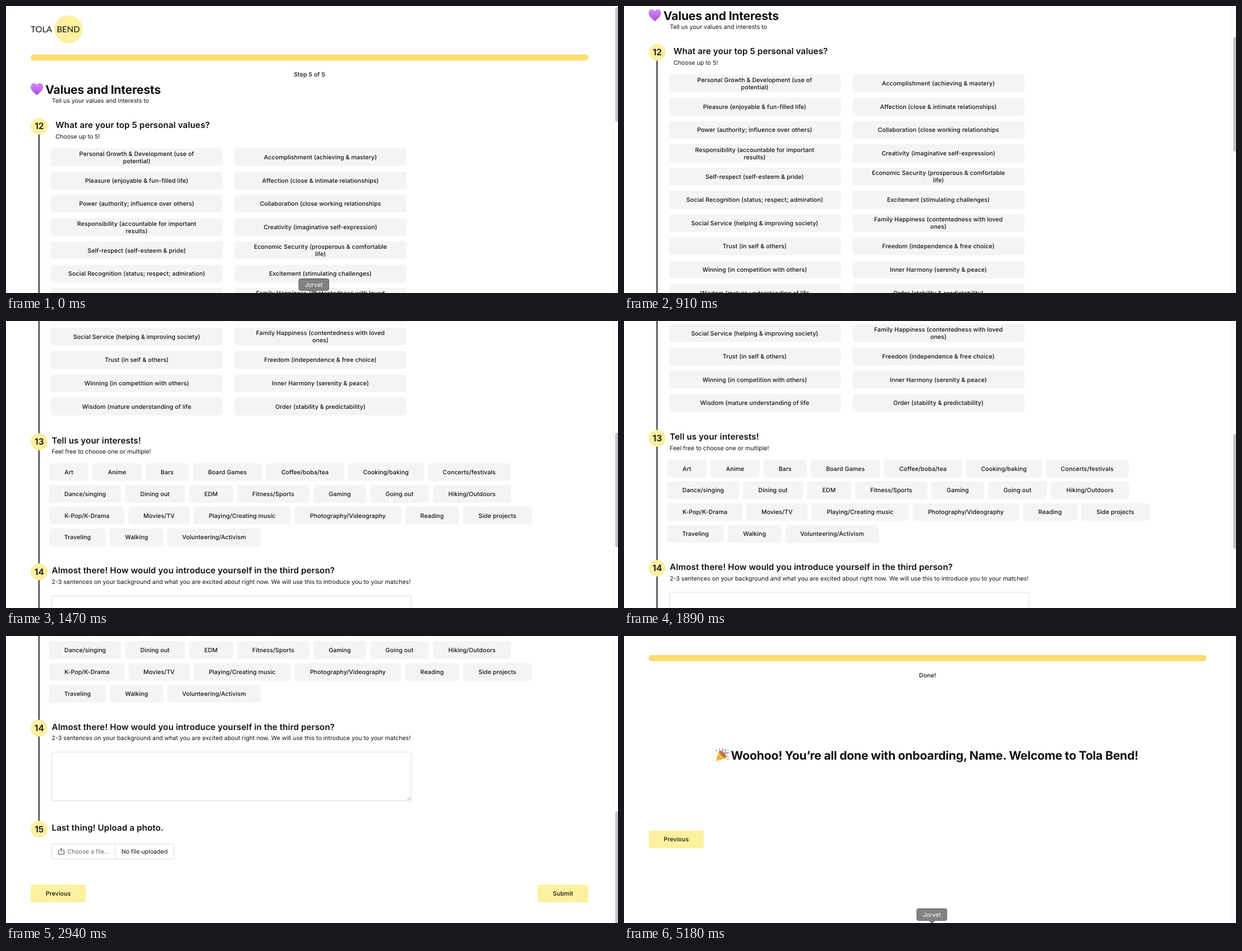
Animation of 1091 by 513 pixels, one loop 5.25 s. Source, as an HTML page:

```html
<!DOCTYPE html>
<html lang="en">
<head>
<meta charset="utf-8">
<title>Onboarding form</title>
<style>
  html, body { margin: 0; width: 100%; height: 100%; overflow: hidden; background: #fff; }
  svg { display: block; width: 1091px; height: 513px; }
  text { font-family: Inter, sans-serif; font-size: 10.6px; fill: #111; text-rendering: geometricPrecision; }
  .label { font-weight: 500; letter-spacing: .008em; }
  .title { font-size: 15.15px; font-weight: 600; letter-spacing: .007em; }
  .big { font-size: 21.2px; font-weight: 700; letter-spacing: -.012em; }
  .num { font-size: 15.6px; font-weight: 600; }
  .logo { font-family: Lato, sans-serif; font-size: 15px; }
  .mute { fill: #6a6a6a; }
  .tip { fill: #fff; }
</style>
</head>
<body>
<svg id="stage" viewBox="0 0 1091 513">
  <defs>
    <linearGradient id="violet" x1="0" y1="0" x2="0" y2="1">
      <stop offset="0" stop-color="#d48bf5"/>
      <stop offset="1" stop-color="#a650dd"/>
    </linearGradient>
  </defs>
  <g id="form"></g>
  <g id="done"></g>
  <rect x="1083" width="1" height="513" fill="#f1f1f1"/>
  <rect id="thumb" x="1086" y="2" width="8" height="205" rx="3.5" fill="#c5c5c5"/>
  <g id="tip"></g>
</svg>
<script>
const NS = 'http://www.w3.org/2000/svg';
const $ = id => document.getElementById(id);
const form = $('form'), done = $('done'), tip = $('tip'), thumb = $('thumb');
const PALE = '#fdf0a0', GOLD = '#fbdd6f', GREY = '#f4f4f4', INK = '#111';

function add(parent, tag, attrs) {
  const el = document.createElementNS(NS, tag);
  for (const k in attrs) el.setAttribute(k, attrs[k]);
  return parent.appendChild(el);
}
const rect = (p, x, y, width, height, rx, fill, more) =>
  add(p, 'rect', { x, y, width, height, rx, fill, ...more });
const path = (p, d, attrs) => add(p, 'path', { d, fill: 'none', ...attrs });
const disc = (cx, cy, r) =>
  add(form, 'circle', { cx, cy, r, fill: PALE, stroke: PALE, 'stroke-opacity': .5, 'stroke-width': 1.5 });

// y is the middle of the capitals
const CAP = { title: 5.1, big: 7.3, num: 5.4, logo: 5.4 };
function text(p, str, x, y, cls = '', anchor = 'start') {
  add(p, 'text', { x, y: y + (CAP[cls] || 3.85), class: cls, 'text-anchor': anchor }).textContent = str;
}
const label = (p, str, x, y, cls = 'label') => text(p, str, x, y, cls, 'middle');

function button(p, str, x, y, w) {
  rect(p, x, y - 15.8, w, 31.5, 4, PALE);
  label(p, str, x + w / 2, y);
}
const bar = (p, y) => rect(p, 44, y - 5.4, 994.5, 10.8, 5.4, GOLD);

function question(n, y, titleX, titleY, title, sub) {
  disc(59, y, 14.6);
  label(form, n, 59.3, y, 'num');
  text(form, title, titleX, titleY, 'title');
  if (sub) text(form, sub, titleX, titleY + 20);
}

function buildHead() {
  disc(111.5, 41.5, 24.6);
  text(form, 'TOLA', 44, 41.7, 'logo');
  label(form, 'BEND', 111, 41.7, 'logo');
  bar(form, 92.2);
  label(form, 'Step 5 of 5', 541, 122.2);
  path(form, 'M55 159.500C50 154.500 44 151 44 145C44 140.500 47 137.800 50 137.800C52.500 137.800 54 139.500 55 141.500' +
    'C56 139.500 57.500 137.800 60 137.800C63 137.800 66 140.500 66 145C66 151 60 154.500 55 159.500Z', { fill: 'url(#violet)' });
  text(form, 'Values and Interests', 70.3, 149.6, 'big');
  text(form, 'Tell us your values and interests to', 81.8, 169.3);
}

function buildValues() {
  const columns = [
    ['Personal Growth & Development (use of|potential)', 'Pleasure (enjoyable & fun-filled life)',
      'Power (authority; influence over others)', 'Responsibility (accountable for important|results)',
      'Self-respect (self-esteem & pride)', 'Social Recognition (status; respect; admiration)',
      'Social Service (helping & improving society)', 'Trust (in self & others)',
      'Winning (in competition with others)', 'Wisdom (mature understanding of life'],
    ['Accomplishment (achieving & mastery)', 'Affection (close & intimate relationships)',
      'Collaboration (close working relationships', 'Creativity (imaginative self-expression)',
      'Economic Security (prosperous & comfortable|life)', 'Excitement (stimulating challenges)',
      'Family Happiness (contentedness with loved|ones)', 'Freedom (independence & free choice)',
      'Inner Harmony (serenity & peace)', 'Order (stability & predictability)']
  ];
  columns.forEach((items, c) => items.forEach((item, i) => {
    const x = 79.8 + c * 327.5, y = 270.3 + i * 41.62, lines = item.split('|');
    rect(form, x, y - 15.8, 306.6, 31.6, 5, GREY);
    lines.forEach((s, k) => label(form, s, x + 153.2, y + (k - (lines.length - 1) / 2) * 13));
  }));
}

function buildInterests() {
  const rows = [
    [['Art', 70.3], ['Anime', 87.7], ['Bars', 77.5], ['Board Games', 123.6], ['Coffee/boba/tea', 139.2],
      ['Cooking/baking', 135.6], ['Concerts/festivals', 148]],
    [['Dance/singing', 128.2], ['Dining out', 107.3], ['EDM', 79], ['Fitness/Sports', 129],
      ['Gaming', 94.5], ['Going out', 105], ['Hiking/Outdoors', 139.8]],
    [['K-Pop/K-Drama', 134.4], ['Movies/TV', 109.2], ['Playing/Creating music', 173.5],
      ['Photography/Videography', 190], ['Reading', 96.4], ['Side projects', 123]],
    [['Traveling', 101], ['Walking', 95.8], ['Volunteering/Activism', 167]]
  ];
  rows.forEach((row, r) => {
    const y = 762 + r * 38.88;
    let x = 77;
    for (const [name, w] of row) {
      rect(form, x, y - 15.8, w, 31.6, 5, GREY);
      label(form, name, x + w / 2, y);
      x += w + 6.8;
    }
  });
}

function buildInputs() {
  const edge = { stroke: '#dcdcdc', 'stroke-width': 1 };
  rect(form, 81.5, 983.2, 640.5, 86.6, 2, '#fff', edge);
  path(form, 'M715.500 1068.500L721 1063M718.500 1068.500L721 1066', { stroke: '#777', 'stroke-width': .8 });
  rect(form, 81.5, 1147, 218, 27.2, 2, '#fff', edge);
  path(form, 'M194.800 1147V1174.200', edge);
  path(form, 'M95.500 1158.500H93.500V1165.500H103.500V1158.500H101.500M98.500 1162V1155.500M96 1157.800L98.500 1155.200L101 1157.800',
    { stroke: '#444', 'stroke-width': 1, 'stroke-linejoin': 'round' });
  text(form, 'Choose a file...', 109.5, 1161, 'mute');
  label(form, 'No file uploaded', 247, 1160.5, '');
  button(form, 'Previous', 44, 1235.9, 98.3);
  button(form, 'Submit', 947.5, 1235.9, 91);
}

function buildDone() {
  bar(done, 39.5);
  label(done, 'Done!', 541.2, 70);
  path(done, 'M163.500 224L169.500 204.500Q179 208 183 218Z', { fill: '#f8c04a' });
  path(done, 'M166.500 215L173.500 221M168.500 208.500L179 219', { stroke: '#dd9430', 'stroke-width': 1.2 });
  add(done, 'ellipse', { cx: 176.2, cy: 211.2, rx: 2.8, ry: 9, fill: '#b9772c',
    transform: 'rotate(-45 176.200 211.200)' });
  path(done, 'M174 210Q177 207 175 201.500M178 212Q181 208 186.500 209', { stroke: '#e25563', 'stroke-width': 1.5 });
  path(done, 'M177 211Q182 207 181 202.500', { stroke: '#4a9be0', 'stroke-width': 1.5 });
  const bits = [[165, 204.5, '#e25563'], [170, 202, '#4a9be0'], [185.5, 203.5, '#f3c43f'],
    [185, 214, '#4a9be0'], [178.5, 203.5, '#8bc45a'], [185, 220, '#e25563']];
  for (const [cx, cy, fill] of bits) add(done, 'circle', { cx, cy, r: 1.1, fill });
  text(done, 'Woohoo! You’re all done with onboarding, Name. Welcome to Tola Bend!', 190.6, 213.4, 'big');
  button(done, 'Previous', 44, 363.6, 98.3);
}

function buildTip() {
  path(tip, 'M525 487.500H572.500Q575.500 487.500 575.500 490.500V505.500Q575.500 508.500 572.500 508.500' +
    'H554.500L549 513.500L543.500 508.500H525Q522 508.500 522 505.500V490.500Q522 487.500 525 487.500Z',
    { fill: '#828282', stroke: '#5c5c5c', 'stroke-width': 1 });
  label(tip, 'Jorvet', 548.7, 497.8, 'tip');
}

rect(form, 57.9, 215, 1.8, 900, 0, INK);
buildHead();
question('12', 215, 88.3, 213.2, 'What are your top 5 personal values?', 'Choose up to 5!');
buildValues();
question('13', 707.9, 81.6, 705.6, 'Tell us your interests!', 'Feel free to choose one or multiple!');
buildInterests();
question('14', 940.3, 81.6, 938, 'Almost there! How would you introduce yourself in the third person?',
  '2-3 sentences on your background and what you are excited about right now. We will use this to introduce you to your matches!');
question('15', 1120.7, 81.6, 1118.3, 'Last thing! Upload a photo.');
buildInputs();
buildDone();
buildTip();

// [time, scroll]
const LOOP = 5250, TICK = 70;
const SCROLL = [
  [0, 0], [70, 6], [140, 22], [280, 64], [350, 82], [420, 99], [490, 101.3], [560, 101.3],
  [630, 112], [700, 115], [840, 115], [910, 132], [980, 183], [1120, 316.3], [1190, 372],
  [1260, 420], [1330, 458], [1400, 484], [1470, 492], [1540, 496], [1680, 498.3], [1960, 498.3],
  [2030, 560], [2100, 630], [2170, 660], [2310, 660], [2380, 682], [2450, 744.8], [2520, 768],
  [2590, 775.5], [LOOP, 775.5]
];
const DONE_AT = 4130, TIP_ON = 5040, TIP_OFF = 140;

function scrollAt(t) {
  const i = SCROLL.findIndex(k => k[0] > t);
  const [t0, s0] = SCROLL[i - 1], [t1, s1] = SCROLL[i];
  return s0 + (s1 - s0) * (t - t0) / (t1 - t0);
}
const show = (el, on) => el.setAttribute('visibility', on ? 'visible' : 'hidden');

function draw(now) {
  const t = Math.floor((now % LOOP) / TICK) * TICK;
  const s = scrollAt(t), finished = t >= DONE_AT;
  form.setAttribute('transform', `translate(0 ${-s})`);
  thumb.setAttribute('y', 2 + s * .4014);
  show(form, !finished);
  show(thumb, !finished);
  show(done, finished);
  show(tip, t >= TIP_ON || t < TIP_OFF);
}

const start = performance.now();
function frame() {
  draw(performance.now() - start);
  requestAnimationFrame(frame);
}
frame();
</script>
</body>
</html>
```
